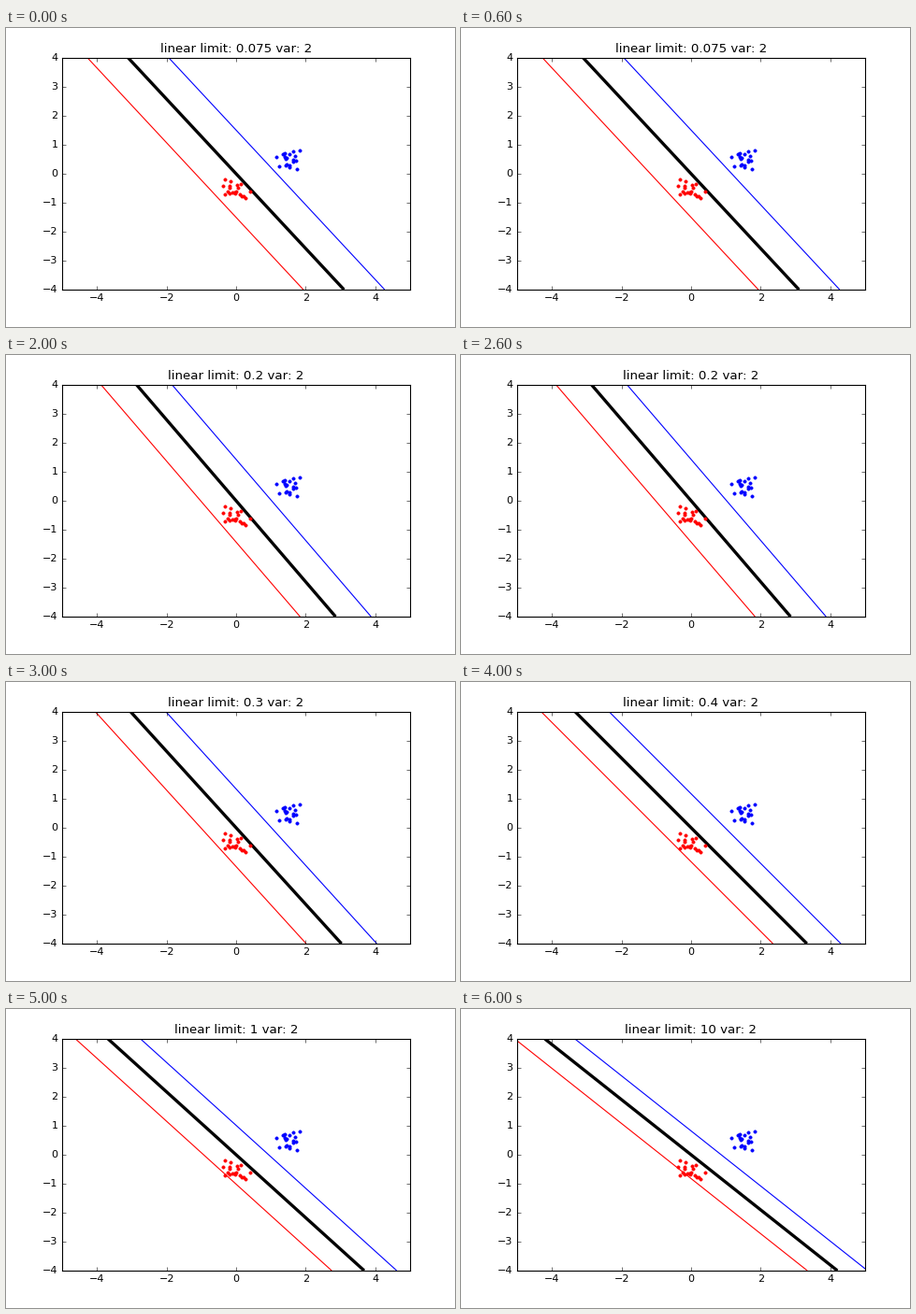
Animation, 480 px wide and 320 px high, one loop 7 s. Source, as a matplotlib script:

```python
import numpy as np
import matplotlib.pyplot as plt
from matplotlib.animation import FuncAnimation

plt.style.use("classic")
plt.rcParams.update({
    "font.family": "DejaVu Sans",
    "font.size": 10,
    "savefig.dpi": "figure",
    "savefig.facecolor": "white",
})

LIMITS = [0.075, 0.1, 0.2, 0.3, 0.4, 1, 10]

np.random.seed(100)
blue = np.random.randn(20, 2) * 0.2 + [1.5, 0.5]
red = np.random.randn(20, 2) * 0.2 + [0, -0.5]
points = np.concatenate((blue, red))
labels = np.repeat([1.0, -1.0], 20)


def fit(limit):
    """Normal vector of the soft-margin linear classifier."""
    low = np.where(labels > 0, 0, -limit)
    high = np.where(labels > 0, limit, 0)
    weights = np.zeros(len(points))
    normal = np.zeros(2)
    for _ in range(10000):
        # Move weight along the pair that violates optimality most.
        error = labels - points @ normal
        i = np.argmax(np.where(weights < high, error, -np.inf))
        j = np.argmin(np.where(weights > low, error, np.inf))
        gap = error[i] - error[j]
        if gap < 1e-6:
            break
        delta = points[i] - points[j]
        step = min(gap / (delta @ delta),
                   high[i] - weights[i], weights[j] - low[j])
        weights[i] += step
        weights[j] -= step
        normal += step * delta
    return normal


normals = [fit(limit) for limit in LIMITS]

fig = plt.figure(figsize=(6, 4), dpi=80, facecolor="white")
ax = fig.add_axes([0.125, 0.125, 0.775, 0.775])
ax.set_xlim(-5, 5)
ax.set_ylim(-4, 4)
ax.set_xticks(range(-4, 5, 2))
ax.set_yticks(range(-4, 5))
# Just left of centre, so half-pixel positions round down.
title = ax.set_title("", fontsize=12, x=0.4998)

ys = np.array([-4.0, 4.0])
lines = [
    (level, ax.plot([], [], color=color, linewidth=width,
                    solid_capstyle="butt")[0])
    for level, color, width in ((-1, "r", 1), (0, "k", 3), (1, "b", 1))
]
for cloud, color in ((blue, "b"), (red, "r")):
    ax.plot(*cloud.T, ".", color=color, markeredgecolor=color)


def update(i):
    wx, wy = normals[i]
    title.set_text(f"linear limit: {LIMITS[i]} var: 2")
    for level, line in lines:
        line.set_data((level - wy * ys) / wx, ys)
    return [title] + [line for _, line in lines]


anim = FuncAnimation(fig, update, frames=len(LIMITS), interval=1000,
                     repeat=True, repeat_delay=0, blit=False)
plt.show()
```
